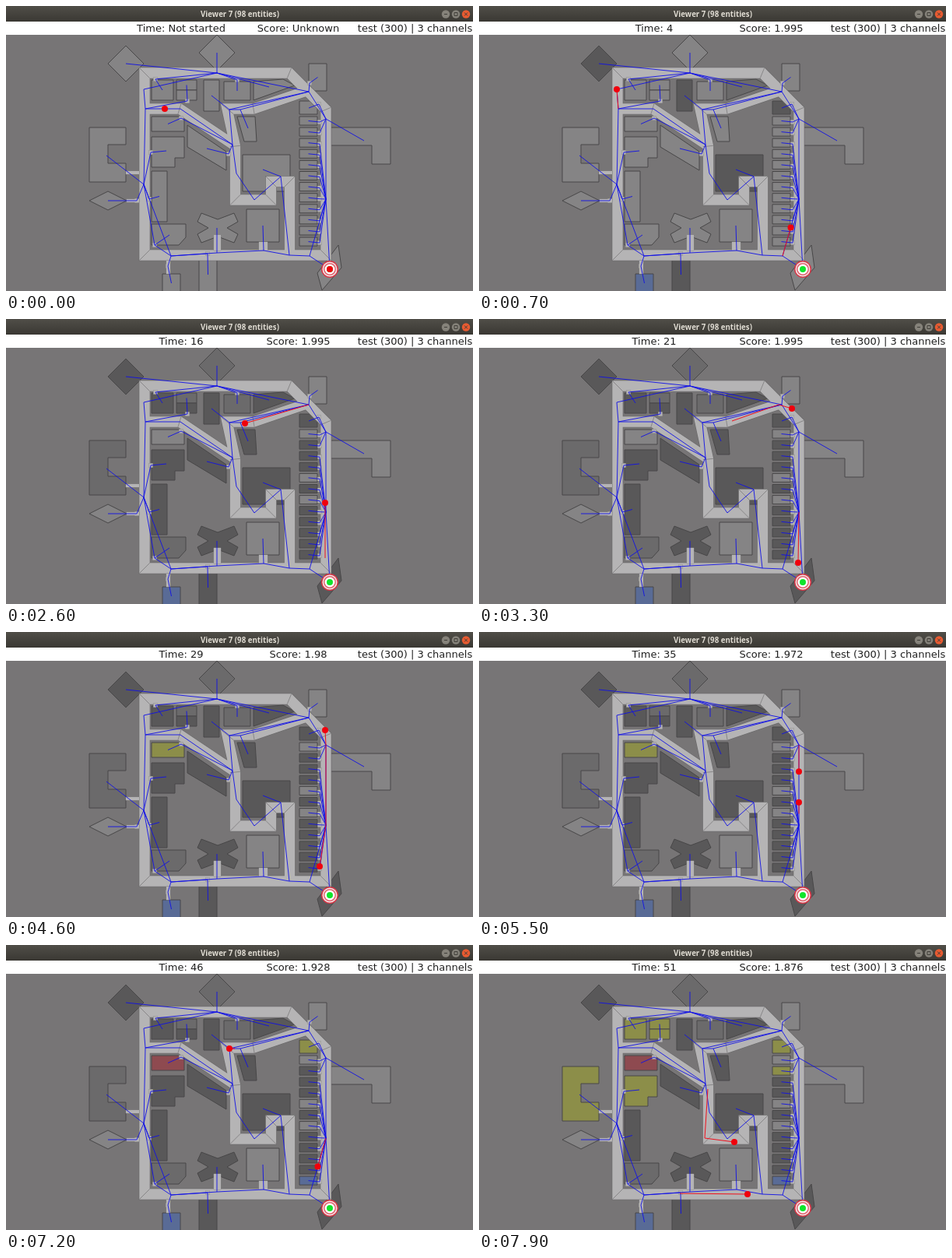
Animation of 600x366 px, one loop 8 s. Source, as an HTML page with a canvas:

```html
<!DOCTYPE html>
<html lang="en">
<head>
<meta charset="utf-8">
<title>Viewer</title>
<style>
  html, body { margin: 0; width: 600px; height: 366px; overflow: hidden; background: #777576; }
  canvas { display: block; }
</style>
</head>
<body>
<canvas id="stage" width="600" height="366"></canvas>
<script>
const LOOP = 8000;
const ctx = document.getElementById('stage').getContext('2d');
const shade = { n: '#858485', d: '#595859', m: '#6b6a6b', y: '#8c8e49', o: '#ad7740', r: '#8e4a50', b: '#596b96' };

// Junctions of the route graph
const hub = {
  n: [271, 86], a: [177, 107], g: [179, 132], w: [177, 229], v: [191, 307], s: [212, 321],
  m: [271, 317], p: [331, 314], q: [364, 320], z: [390, 321], R: [416, 338], e: [411, 248],
  E: [411, 145], t: [389, 110], c: [301, 133], b: [287, 133], i: [291, 178], k: [224, 132],
  u: [296, 215], d: [319, 249], j: [353, 219]
};
const links = new Path2D(), doors = new Path2D();
const buildings = [];

function trace(path, points, close) {
  points.forEach((p, i) => i ? path.lineTo(...p) : path.moveTo(...p));
  if (close) path.closePath();
  return path;
}
for (const chain of 'ant nE agw gki wvs ws smpqze zRe eEt tcb tb biud djq'.split(' '))
  trace(links, [...chain].filter(h => chain != 'nE').map(h => hub[h]));

// A building's link runs from its middle through an optional door to a junction.
// Mood: d and m darken early, D and M later; fires map ticks to shades.
function add(outline, middle, to, door, mood = '', fires = {}) {
  const n = buildings.length;
  const plan = Object.entries(fires).map(([tick, s]) => [+tick, s]);
  const early = mood == mood.toLowerCase();
  if (mood) plan.unshift([early ? 2 + n * 5 % 7 : 10 + n % 6, mood.toLowerCase()]);
  buildings.push({ outline: trace(new Path2D(), outline, true), plan });
  if (to) trace(links, door ? [middle, door, hub[to]] : [middle, hub[to]]);
  if (door) doors.rect(door[0] - 2.5, door[1] - 2.5, 5, 5);
}
const rect = (x, y, w, h, ...rest) =>
  add([[x, y], [x + w, y], [x + w, y + h], [x, y + h]], [x + w / 2, y + h / 2], ...rest);
const diamond = (x, y, rx, ry, ...rest) =>
  add([[x, y - ry], [x + rx, y], [x, y + ry], [x - rx, y]], [x, y], ...rest);

diamond(154, 74, 23, 23, 'n', null, 'd');
diamond(271, 60, 23, 23, 'n', null, 'M');
diamond(131, 250, 24, 12, 'w', [168, 250]);
rect(389, 74, 23, 35, 't', [390, 99]);
rect(187, 95, 28, 26, 'n', [192, 94], 'd', { 47: 'y' });
rect(219, 95, 26, 13, 'g', [233, 122], 'M', { 48: 'y' });
rect(219, 108, 26, 13, '', null, 'D', { 48: 'y' });
rect(254, 95, 20, 40, 'b', null, 'd');
rect(280, 97, 34, 24, 'n', [297, 95], 'M');
rect(187, 142, 42, 19, 'i', [225, 144], '', { 28: 'y', 37: 'o', 46: 'r' });
rect(187, 212, 20, 65, 'w', [184, 248], 'D');
rect(309, 261, 42, 42, 'p');
rect(201, 344, 23, 24, 's', [208, 334], '', { 3: 'b' });
rect(248, 322, 23, 46, 's', [259, 318], 'd');
add([[318, 97], [356, 94], [371, 102], [318, 121]], [338, 104], 'n', null, 'm', { 13: 'd' });
add([[233, 153], [283, 187], [283, 211], [233, 181]], [258, 183], 'i', [286, 190], 'd');
add([[297, 142], [320, 142], [322, 174], [306, 174]], [311, 157], 'c', null, 'D');
add([[304, 191], [365, 191], [365, 238], [304, 238]], [330, 210], 'j', null, 'd');
add([[187, 168], [229, 168], [229, 195], [217, 195], [217, 207], [187, 207]],
  [206, 186], 'w', [186, 188], 'd', { 49: 'y' });
add([[107, 156], [154, 156], [154, 178], [131, 178], [131, 202], [154, 202], [154, 226], [107, 226]],
  [129, 192], 'w', null, 'm', { 50: 'y' });
add([[187, 280], [231, 280], [231, 297], [222, 307], [187, 307]], [210, 294], 'v', [191, 307], 'M');
add([[412, 156], [494, 156], [494, 203], [470, 203], [470, 179], [412, 179]], [460, 173], 'E');
add([[427, 307], [431, 336], [406, 365], [400, 343]], [416, 338], '', null, 'D');

// Cross-shaped block: one half, then the same half turned around
const half = [[0, -11], [21, -19], [26, -8], [12, 0], [26, 8], [21, 19]];
add([...half, ...half.map(([x, y]) => [-x, -y])].map(([x, y]) => [272 + x, 285 + y]), hub.m.map((v, i) => v - 32 * i), 'm', null, 'd');

// Row of small houses
add([[377, 122], [393, 122], [400, 130], [400, 139], [377, 139]], [389, 131], 'E', [402, 126], 'd', { 45: 'y' });
for (let i = 0; i < 12; i++) {
  const y = 142 + 14.1 * i;
  const mood = i == 0 || i == 4 || i == 6 ? '' : 'D';
  rect(377, y, 23, 11, i < 2 ? 'E' : 'e', [403, y + 7], mood, i == 1 ? { 47: 'y' } : i == 11 ? { 40: 'b' } : {});
}

// Road centre lines; the ring repeats its first corners to close
const ring = [[178, 86], [364, 86], [411, 133], [411, 320], [178, 320]];
const roadLines = [
  [...ring, ring[0], ring[1]],
  [[178, 132], [223, 132], [295, 180]],
  [[389, 108], [318, 132], [284, 132], [294.5, 180], [294.5, 249], [340.5, 249], [340.5, 225.5], [364.5, 225.5], [364.5, 320]]
];
const roads = new Path2D(), seams = new Path2D();
const unit = (a, b) => {
  const d = Math.hypot(b[0] - a[0], b[1] - a[1]);
  return [(b[0] - a[0]) / d, (b[1] - a[1]) / d];
};
for (const line of roadLines) {
  trace(roads, line);
  // seam across each bend, along its bisector
  for (let i = 1; i < line.length - 1; i++) {
    const [x, y] = line[i], a = unit(line[i - 1], line[i]), b = unit(line[i], line[i + 1]);
    const [dx, dy] = unit(a, b);
    const reach = 13.4 / Math.hypot(a[0] + b[0], a[1] + b[1]);
    trace(seams, [[x - dx * reach, y - dy * reach], [x + dx * reach, y + dy * reach]]);
  }
}
doors.rect(154, 212, 17, 4);
doors.rect(155, 248, 16, 4);
doors.rect(267, 294, 9, 20);
doors.rect(325, 303, 11, 11);
doors.rect(206, 327, 5, 17);

// Waypoints: tick, then a junction or x, y
const walks = [[
  [0, 204, 132], [1, 204, 132], [3, 'g'], [4, 'a'], [7, 'n'], [8, 271, 58], [9, 271, 81],
  [11, 'n'], [15, 't'], [16, 307, 134], [17, 'b'], [18, 'b'], [20, 325, 131], [20.8, 385, 110],
  [21, 402, 115], [25, 396, 119], [27, 'E'], [28, 411, 215], [28.8, 'E'], [29, 410, 126],
  [31, 396, 119], [34, 'E'], [37, 'e'], [40, 411, 195], [40.6, 412, 140], [41, 396, 119],
  [42, 't'], [44, 'c'], [46, 'b'], [50, 294, 185], [50.6, 290, 248], [51, 328, 253]
], [
  [0, 'R'], [1, 'R'], [3, 'z'], [5, 'e'], [8, 402, 190], [9, 388, 190], [10, 388, 190],
  [12, 'e'], [15, 410, 307], [16, 410, 236], [18, 411, 180], [20, 'e'], [21, 410, 313],
  [24, 'z'], [26, 'e'], [28, 411, 215], [28.7, 'e'], [29, 403, 301], [30, 390, 301],
  [33, 'e'], [38, 411, 175], [40, 402, 161], [41, 393, 161], [42, 411, 161], [45, 'e'],
  [47, 'z'], [50, 258, 319], [51, 345, 320]
]].map(walk => walk.map(([tick, x, y]) => hub[x] ? [tick, ...hub[x]] : [tick, x, y]));

const clock = [[0, 0], [1500, 9.5], [2600, 16.5], [3300, 21.3], [4600, 29.5], [6500, 41.5], [7900, 51.3]];
const scores = [[0, 'Unknown'], [1, 1.995], [24, 1.99], [28, 1.98], [34, 1.972], [40, 1.963],
  [43, 1.949], [46, 1.928], [49, 1.901], [51, 1.876]];

// Linear interpolation of rows keyed by their first value
function at(rows, key) {
  const i = rows.findIndex(r => r[0] >= key);
  if (i < 1) return rows[i < 0 ? rows.length - 1 : 0].slice(1);
  const a = rows[i - 1], b = rows[i], f = (key - a[0]) / (b[0] - a[0]);
  return a.slice(1).map((v, j) => v + (b[j + 1] - v) * f);
}
const latest = (rows, key, start) => rows.reduce((v, r) => r[0] <= key ? r[1] : v, start);

function dot(x, y, r, color) {
  ctx.fillStyle = color;
  ctx.beginPath();
  ctx.arc(x, y, r, 0, 7);
  ctx.fill();
}
function line(path, color, width) {
  ctx.strokeStyle = color;
  ctx.lineWidth = width;
  ctx.stroke(path);
}

function drawMap(tick) {
  ctx.fillStyle = '#777576';
  ctx.fillRect(0, 0, 600, 366);
  for (const { outline, plan } of buildings) {
    ctx.fillStyle = shade[latest(plan, tick, 'n')];
    ctx.fill(outline);
    line(outline, '#484748', 1);
  }
  line(roads, '#686768', 14.6);
  line(roads, '#b5b4b5', 13.4);
  line(doors, '#858485', 0.7);
  ctx.fillStyle = '#b5b4b5';
  ctx.fill(doors);
  line(seams, '#747374', 0.7);
  line(links, '#1010e6', 0.9);
}

function drawRefuge() {
  const [x, y] = hub.R;
  dot(x, y, 11, '#d83848');
  dot(x, y, 9.5, '#f4e8e8');
  dot(x, y, 8, '#df6470');
  dot(x, y, 6.5, '#fff');
  dot(x, y, 4, '#10e52c');
}

function drawWalker(walk, tick) {
  const end = at(walk, tick);
  const passed = walk.filter(p => p[0] > tick - 1 && p[0] < tick).map(p => p.slice(1));
  line(trace(new Path2D(), [at(walk, tick - 1), ...passed, end]), '#f0101c', 1);
  dot(...end, 4, '#f0000c');
}

function drawHeader(tick) {
  const bar = ctx.createLinearGradient(0, 0, 0, 20);
  bar.addColorStop(0, '#504e48');
  bar.addColorStop(1, '#3a3833');
  ctx.fillStyle = bar;
  ctx.fillRect(0, 0, 600, 20);
  ctx.textAlign = 'center';
  ctx.fillStyle = '#dfdbd2';
  ctx.font = 'bold 9.7px "Open Sans", sans-serif';
  ctx.fillText('Viewer 7 (98 entities)', 300.5, 13.5);

  for (let i = 0; i < 3; i++) dot(565 + 13 * i, 10.5, 5.2, i == 2 ? '#e95b31' : '#85827a');
  line(new Path2D('M563 10.5h4M576 8.5h4v4h-4zM589 8.5l4 4m0-4l-4 4'), '#403e39', 1);

  ctx.fillStyle = '#fff';
  ctx.fillRect(0, 20, 600, 17);
  ctx.fillStyle = '#202020';
  ctx.font = '13px "DejaVu Sans", sans-serif';
  ctx.fillText('Time: ' + (tick < 1 ? 'Not started' : tick), 225, 33);
  ctx.fillText('Score: ' + latest(scores, tick), 375.5, 33);
  ctx.fillText('test (300) | 3 channels', 525.5, 33);
}

function frame() {
  const tick = Math.floor(at(clock, performance.now() % LOOP)[0]);
  drawMap(tick);
  drawRefuge();
  for (const walk of walks) drawWalker(walk, tick);
  drawHeader(tick);
  requestAnimationFrame(frame);
}
frame();
</script>
</body>
</html>
```
